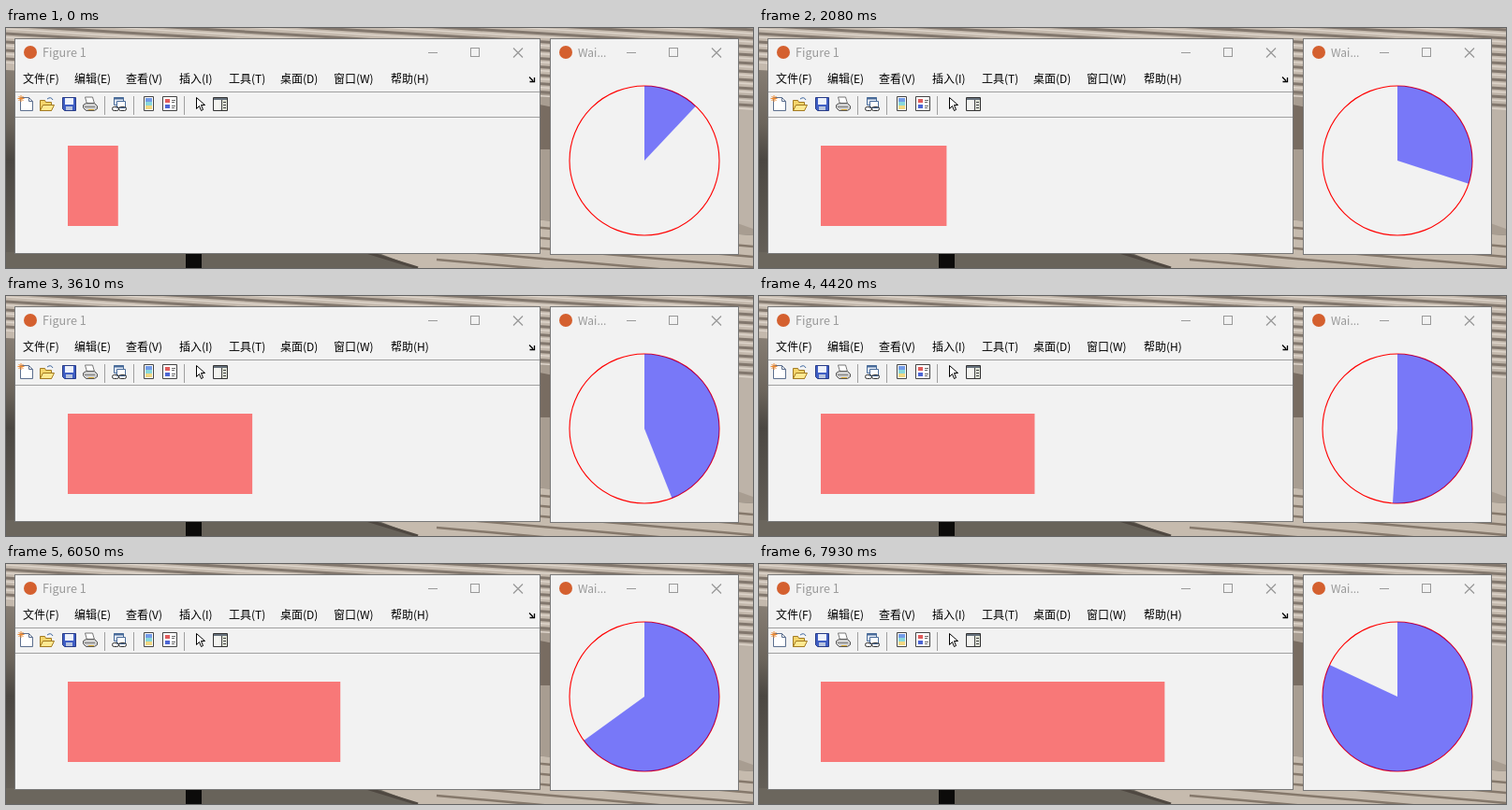
Animation of 798 by 257 pixels, one loop 8000 ms. Source, as an HTML page:

```html
<!DOCTYPE html>
<html lang="zh">
<head>
<meta charset="utf-8">
<style>
html, body { margin: 0; width: 100%; height: 100%; overflow: hidden; }
svg { display: block; width: 798px; height: 257px; }
text { font: 12px "Noto Sans CJK SC", "Noto Sans CJK JP", "Noto Sans CJK", "Noto Sans", sans-serif; }
.title { fill: #999; }
.win { fill: #f2f2f2; stroke: #777; }
.ctl { fill: none; stroke: #999; }
.rule { stroke: #a0a0a0; }
</style>
</head>
<body>
<svg viewBox="0 0 798 257">
  <defs>
    <linearGradient id="wall" x2="0" y2="1">
      <stop offset="0" stop-color="#9c9186"/>
      <stop offset=".4" stop-color="#6b645b"/>
      <stop offset=".55" stop-color="#4b4742"/>
      <stop offset="1" stop-color="#68635b"/>
    </linearGradient>
    <g id="controls" class="ctl">
      <path d="M-5 26.500h10"/>
      <path d="M86 21.500l10 10M96 21.500l-10 10" stroke-width="1.300"/>
      <rect x="40.500" y="21.500" width="9" height="9"/>
    </g>
  </defs>

  <!-- backdrop -->
  <rect width="798" height="257" fill="url(#wall)"/>
  <path d="M0 0H798V85L0 45z" fill="#c4b9ad"/>
  <path d="M560 66L798 85V222L560 205z" fill="#a89d91"/>
  <path d="M560 80L600 88V130H560z" fill="#786c61"/>
  <path d="M770 70H798V215L770 205z" fill="#bdb3a8"/>
  <path d="M0 240H192V257H0z" fill="#6b665d"/>
  <path d="M209 240H400L440 257H209z" fill="#68635a"/>
  <path d="M192 236H209V257H192z" fill="#0c0b0a"/>
  <path d="M385 236L560 205L798 222V257H440z" fill="#c6bbae"/>
  <g id="slats" fill="none"></g>

  <!-- main window -->
  <rect class="win" x="9.500" y="11.500" width="561" height="230"/>
  <circle cx="26" cy="26" r="7" fill="#d4602f"/>
  <text class="title" x="39" y="31" style="font-size:12.600px">Figure 1</text>
  <use href="#controls" x="456"/>
  <g id="menu"></g>
  <path d="M559 52.500l4 4M564.500 53v4.500h-5" fill="none" stroke="#000" stroke-width="1.300"/>
  <path class="rule" d="M10 68.500H570M10 95.500H570M105.500 73V93M136.500 73V93M190.500 73V93"/>

  <!-- toolbar -->
  <g stroke-width="1">
    <path d="M15.500 74.500h9l4 4v10h-13z" fill="#fff" stroke="#5c6f8e"/>
    <path d="M24.500 74.500v4h4" fill="none" stroke="#5c6f8e"/>
    <path d="M16 72v7M12.500 75.500h7M13.500 73l5 5M18.500 73l-5 5" stroke="#ee8b32"/>
    <path d="M36.500 88.500v-11h5l1 2h6v9z" fill="#f4d56b" stroke="#a27a22"/>
    <path d="M36.500 88.500l3-6h12l-3 6z" fill="#ffe991" stroke="#a27a22"/>
    <path d="M44 76q4-3 6 1" fill="none" stroke="#3d679f"/>
    <path d="M60.500 74.500h14v14h-12l-2-2z" fill="#405fc4" stroke="#263a86"/>
    <path d="M63 75h9v7h-9z" fill="#eef2fb"/>
    <path d="M64 84h7v4h-7z" fill="#b8c4de"/>
    <path d="M86.500 81l-2-7h8l2 7z" fill="#fff" stroke="#777"/>
    <path d="M82.500 82.500l3-2h9l3 3v3l-3 2h-9l-3-3z" fill="#cfcfcf" stroke="#555"/>
    <path d="M84 84.500h11" stroke="#777"/>
    <path d="M88 87.500h6" stroke="#dcae3c"/>
    <path d="M115.500 74.500h10v8h-10z" fill="#e7effa" stroke="#496b99"/>
    <path d="M115 75.500h11" stroke="#496b99" stroke-width="2"/>
    <path d="M118.500 78.500h9v7h-9z" fill="#fff" stroke="#496b99"/>
    <rect x="113.500" y="84.500" width="7" height="4" rx="2" fill="none" stroke="#333"/>
    <rect x="120.500" y="84.500" width="8" height="4" rx="2" fill="none" stroke="#333"/>
    <path d="M147.500 73.500h10v15h-10z" fill="#fff" stroke="#444"/>
    <path d="M149 75h7v4h-7z" fill="#729be8"/>
    <path d="M149 79h7v4h-7z" fill="#88d8db"/>
    <path d="M149 83h7v4h-7z" fill="#f1d883"/>
    <path d="M167.500 73.500h15v15h-15z" fill="#fff" stroke="#444"/>
    <path d="M170 76h5v4h-5z" fill="#e15c5c"/>
    <path d="M170 82h5v4h-5z" fill="#4b65d4"/>
    <path d="M177 77.500h4M177 79.500h3M177 83.500h4M177 85.500h3" stroke="#666"/>
    <path d="M203.500 74.500v12l3-3 2 5 2-1-2-5h4z" fill="#fff" stroke="#000"/>
    <path d="M221.500 74.500h15v14h-15z" fill="#f4f4f0" stroke="#333"/>
    <path d="M222 75h14v2h-14z" fill="#66717c"/>
    <path d="M231 77h5v11h-5z" fill="#dfe3d5"/>
    <path d="M230.500 77v11M232 79.500h3M232 82.500h3M232 85.500h3" stroke="#444"/>
  </g>
  <rect id="bar" x="66" y="126" height="86" fill="#f00" fill-opacity=".5"/>

  <!-- progress window -->
  <rect class="win" x="581.500" y="11.500" width="201" height="231"/>
  <circle cx="598" cy="26" r="7" fill="#d4602f"/>
  <text class="title" x="611" y="31">Wai...</text>
  <use href="#controls" x="668"/>
  <circle cx="682" cy="142" r="80" fill="none" stroke="#f00" stroke-width="1.100"/>
  <path id="pie" fill="#00f" fill-opacity=".5"/>
</svg>
<script>
const LOOP = 8000, STEP = 90, FIRST = 12;

// Bursts of updates: start time, then the percent gained at each step.
// "h" is a moment when the bar has moved on but the pie has not yet.
const bursts = [
  [180, '1111'], [630, '1111'], [1080, '1111'], [1530, '1111'],
  [2080, '2111h1111'], [2890, 'h1111'], [3430, '1111'],
  [3880, '1111h1111'], [4690, 'h11h1'], [5230, '12'], [5500, '111'],
  [5870, '1111h1111'], [6680, '1'], [6860, '1111h1'], [7390, '11'],
  [7660, '1111']
];

const $ = id => document.getElementById(id);

function add(parent, tag, attrs, label) {
  const el = document.createElementNS('http://www.w3.org/2000/svg', tag);
  for (const key in attrs) el.setAttribute(key, attrs[key]);
  if (label) el.textContent = label;
  $(parent).append(el);
}

function slat(x1, y1, x2, y2, color, width) {
  add('slats', 'path', { d: `M${x1} ${y1}L${x2} ${y2}`, stroke: color, 'stroke-width': width });
}

for (let y = -84; y < 40; y += 9) {
  slat(0, y, 798, y + 50, '#82776d', 3);
  slat(0, y + 4, 798, y + 54, '#ddd4ca', 1.5);
}
for (let y = 216; y < 270; y += 11) slat(460, y - 12, 798, y + 18, '#85786b', 2.5);
slat(385, 240, 440, 257, '#4f4841', 3);

const menu = [
  ['文件(F)', 18], ['编辑(E)', 73], ['查看(V)', 128], ['插入(I)', 185],
  ['工具(T)', 238], ['桌面(D)', 293], ['窗口(W)', 350], ['帮助(H)', 411]
];
for (const [label, x] of menu) add('menu', 'text', { x, y: 59 }, label);

function progress(t) {
  let pie = FIRST, bar = FIRST;
  for (const [start, gains] of bursts) {
    for (let i = 0; i < gains.length && start + i * STEP <= t; i++) {
      if (gains[i] === 'h') bar = pie + 1;
      else bar = pie += Number(gains[i]);
    }
  }
  return { bar, pie };
}

function draw(t) {
  const { bar, pie } = progress(t);
  const a = pie / 100 * 2 * Math.PI;
  const x = 682 + 80 * Math.sin(a), y = 142 - 80 * Math.cos(a);
  $('bar').setAttribute('width', bar * 4.48);
  $('pie').setAttribute('d', `M682 142V62A80 80 0 ${pie > 50 ? 1 : 0} 1 ${x} ${y}z`);
}

const began = performance.now();
function tick() {
  draw((performance.now() - began) % LOOP);
  requestAnimationFrame(tick);
}
tick();
</script>
</body>
</html>
```
